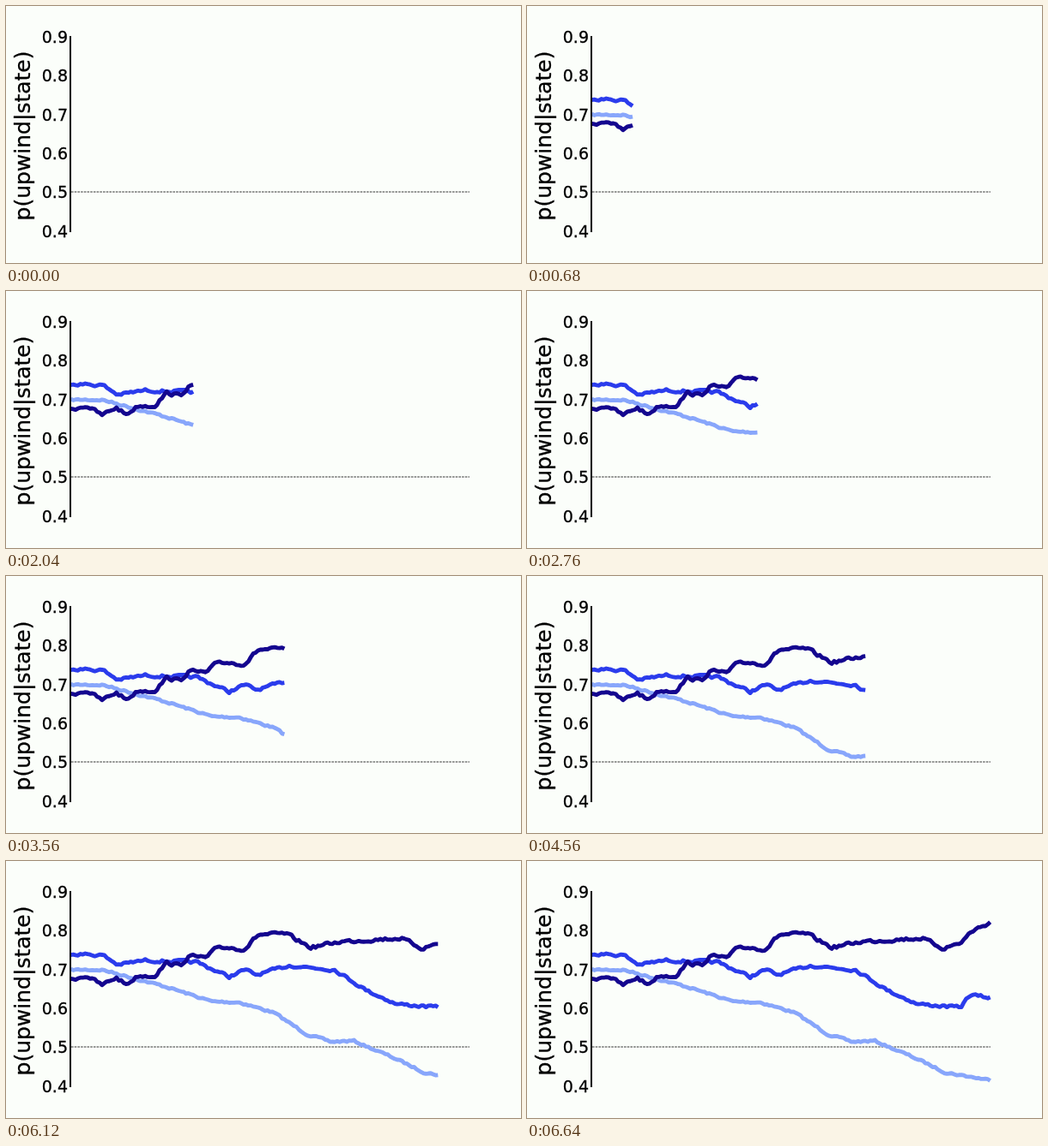
Animation, 600 px wide and 300 px high, one loop 6680 ms. Source, as an HTML page:

```html
<!DOCTYPE html>
<html lang="en">
<head>
<meta charset="utf-8">
<title>Probability of upwind given state</title>
<style>
  html, body { margin: 0; width: 100%; height: 100%; overflow: hidden; background: #fbfefa; }
  svg { display: block; }
  text { font-family: "DejaVu Sans", sans-serif; stroke: #000; stroke-width: 0.3; }
  polyline { fill: none; stroke-width: 4.8; stroke-linejoin: round; }
</style>
</head>
<body>
<svg width="600" height="300" viewBox="0 0 600 300">
  <path d="M76 217H540" stroke="#333" stroke-dasharray="2.6 1.1"/>
  <g id="curves"></g>
  <path d="M75 35V264" stroke="#000" stroke-width="2"/>
  <g id="ticks" font-size="19" text-anchor="end"></g>
  <text transform="translate(28 151.5) rotate(-90)" font-size="25" text-anchor="middle">p(upwind|state)</text>
</svg>
<script>
const FRAME = 40, FRAMES = 167, LEFT = 75.5, STEP = 2.796;

// Each curve is a random walk around a few turning points (x,y).
const curves = [
  { color: '#88a6fb', jitter: 1.1,
    trend: '75,127 112,127 187,147 240,164 272,165 312,177 350,202 378,211 405,210 450,229 488,247 541,256' },
  { color: '#2b3cec', jitter: 1.5,
    trend: '75,108 113,110 130,121 162,116 222,118 260,135 278,127 292,133 330,122 383,127 420,151 455,167 505,171 516,156 541,160' },
  { color: '#14068f', jitter: 1.8,
    trend: '75,138 94,134 112,145 128,136 140,144 154,134 173,134 187,119 203,122 213,111 234,113 247,100 278,103 294,86 326,85 355,101 390,94 460,90 485,102 506,95 518,82 541,71' }
];

function add(parent, tag, attrs) {
  const el = document.createElementNS('http://www.w3.org/2000/svg', tag);
  for (const key in attrs) el.setAttribute(key, attrs[key]);
  return document.getElementById(parent).appendChild(el);
}

let seed = 7;
function random() {
  seed = (seed * 16807) % 2147483647;
  return seed / 2147483647;
}

function heightAt(trend, x) {
  const i = trend.findIndex(p => p[0] >= x);
  const [x0, y0] = trend[i - 1], [x1, y1] = trend[i];
  return y0 + (y1 - y0) * (x - x0) / (x1 - x0);
}

for (let i = 4; i <= 9; i++) {
  add('ticks', 'text', { x: 72, y: 269.5 - (i - 4) * 45.3 }).textContent = '0.' + i;
}

for (const c of curves) {
  const trend = c.trend.split(' ').map(p => p.split(',').map(Number));
  let drift = 0;
  c.points = Array.from({ length: FRAMES }, (_, i) => {
    const x = LEFT + i * STEP;
    drift = drift * 0.4 + (random() * 2 - 1) * c.jitter;
    return `${x.toFixed(2)},${(heightAt(trend, x) + drift).toFixed(2)}`;
  });
  c.line = add('curves', 'polyline', { stroke: c.color });
}

function draw() {
  const frame = Math.floor(performance.now() / FRAME) % FRAMES;
  for (const c of curves) {
    c.line.setAttribute('points', frame ? c.points.slice(0, frame + 1).join(' ') : '');
  }
  requestAnimationFrame(draw);
}
draw();
</script>
</body>
</html>
```
